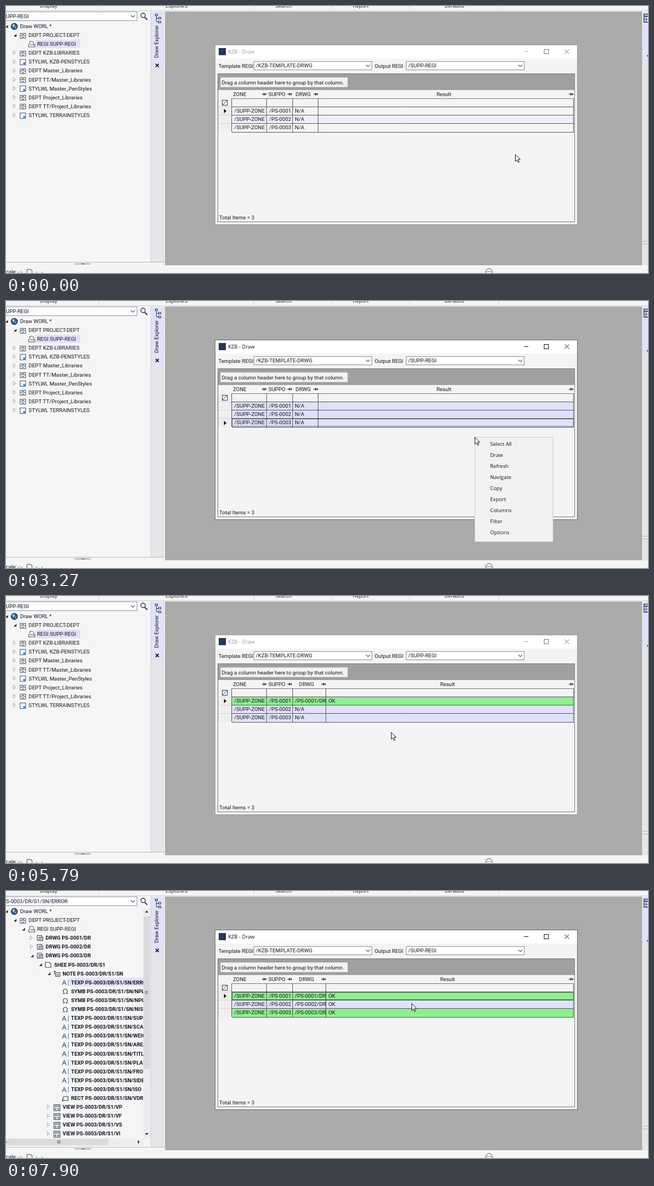
An HTML page with a canvas for the animation above (8 s loop, 1159 by 483 pixels).

```html
<!DOCTYPE html>
<html lang="en">
<head>
<meta charset="utf-8">
<title>Draw</title>
<style>
html, body { margin: 0; width: 100%; height: 100%; overflow: hidden; background: #f5f5f5; }
canvas { display: block; width: 1159px; height: 483px; }
</style>
</head>
<body>
<canvas id="stage"></canvas>
<script>
const W = 1159, H = 483, LOOP = 8000;
const canvas = document.getElementById('stage');
const dpr = window.devicePixelRatio || 1;
canvas.width = W * dpr;
canvas.height = H * dpr;
const g = canvas.getContext('2d');

const UI = '9.6px Roboto, "Liberation Sans", sans-serif';
const BOLD = 'bold 9.4px Roboto, "Liberation Sans", sans-serif';
const TITLE = '9.4px "Open Sans", "Noto Sans", sans-serif';
const INK = '#141420', PANEL = '#f4f4f4', STRIP = '#e6e6ea', LILAC = '#e1e1f9', NAVY = '#26375c', BLUE = '#0078d7';

function box(x, y, w, h, fill, edge, lw = 1) {
  if (fill) { g.fillStyle = fill; g.fillRect(x, y, w, h); }
  if (edge) {
    g.strokeStyle = edge;
    g.lineWidth = lw;
    g.strokeRect(x + lw / 2, y + lw / 2, w - lw, h - lw);
  }
}

function text(s, x, y, color = INK, font = UI, align = 'left') {
  g.font = font;
  g.fillStyle = color;
  g.textAlign = align;
  g.fillText(s, x, y);
}

function path(pts, stroke, lw = 1, fill, close) {
  g.beginPath();
  pts.forEach(([x, y], i) => i ? g.lineTo(x, y) : g.moveTo(x, y));
  if (close) g.closePath();
  if (fill) { g.fillStyle = fill; g.fill(); }
  if (stroke) { g.strokeStyle = stroke; g.lineWidth = lw; g.stroke(); }
}

const hline = (x0, x1, y, c, lw = 1) => path([[x0, y], [x1, y]], c, lw);
const vline = (x, y0, y1, c, lw = 1) => path([[x, y0], [x, y1]], c, lw);

function disc(x, y, r, fill, edge, lw = 1) {
  g.beginPath();
  g.arc(x, y, r, 0, 7);
  if (fill) { g.fillStyle = fill; g.fill(); }
  if (edge) { g.strokeStyle = edge; g.lineWidth = lw; g.stroke(); }
}

function cross(x, y, r, c, lw = 1) {
  path([[x - r, y - r], [x + r, y + r]], c, lw);
  path([[x + r, y - r], [x - r, y + r]], c, lw);
}

function clipped(x, y, w, h, draw) {
  g.save();
  g.beginPath();
  g.rect(x, y, w, h);
  g.clip();
  draw();
  g.restore();
}

const chevron = (x, y, c = '#444') => path([[x - 3.5, y - 1.7], [x, y + 1.8], [x + 3.5, y - 1.7]], c, 1.1);

// Tree icons, centred on x, y
const icons = {
  world(x, y) {
    disc(x, y, 5.8, '#2d5c8c', '#1d2f4a');
    path([[x - 4, y - 2], [x, y - 5], [x + 1, y - 1], [x - 2, y + 2]], 0, 0, '#a9c6d8', true);
    path([[x + 1, y + 1], [x + 4, y], [x + 2, y + 4]], 0, 0, '#a9c6d8', true);
  },
  dept(x, y) {
    box(x - 5, y - 4, 11, 10, '#fff', '#555b66');
    hline(x - 5, x + 6, y + .5, '#555b66');
    hline(x - 2, x + 3, y - 1.5, '#333');
    hline(x - 2, x + 3, y + 3.5, '#333');
  },
  regi(x, y) {
    path([[x - 3, y + 1], [x - 3, y - 5], [x + 2, y - 5], [x + 4, y - 3], [x + 4, y + 1]], '#444b58', 1, '#fff');
    path([[x - 5, y], [x - 5, y + 5], [x + 6, y + 5], [x + 6, y + 1], [x - 2, y + 1]], '#444b58', 1.1);
  },
  style(x, y) {
    box(x - 5, y - 5, 11, 11, '#f8fbff', '#47536a');
    box(x + 1, y + 1, 5, 5, '#4d8fd0');
  },
  drwg(x, y) {
    box(x - 5, y - 5, 9, 10, '#fff', '#333b48');
    box(x - 2, y - 2, 8, 7, '#eef1f5', '#333b48');
    disc(x + 2, y + 1.5, 1.4, null, '#333b48', .8);
  },
  shee(x, y) {
    path([[x - 5, y - 4], [x + 2, y - 4], [x + 5, y - 1], [x + 5, y + 5], [x - 5, y + 5]], '#333b48', 1.1, '#fff', true);
  },
  note(x, y) {
    box(x - 3, y - 2, 9, 8, '#fff', '#333b48');
    hline(x - 1, x + 4, y + 1.5, '#555');
    hline(x - 1, x + 4, y + 3.5, '#555');
    hline(x - 6, x - 2, y - 3.5, '#333b48');
    vline(x - 4.5, y - 5, y + 2, '#333b48');
  },
  texp(x, y) {
    text('A', x - 6, y + 5, '#2c3444', '13px "Open Sans", sans-serif');
    vline(x + 5.5, y - 5, y + 6, '#4b83bd');
  },
  symb(x, y) { text('Ω', x, y + 5, '#2c3444', '13px "Open Sans", sans-serif', 'center'); },
  rect(x, y) {
    path([[x - 5, y + 4], [x - 3, y - 3], [x + 5, y - 3], [x + 5, y + 4]], '#333b48', 1.1, null, true);
    disc(x - 5, y + 4, 1.2, '#333b48');
  },
  view(x, y) {
    box(x - 6, y - 5, 12, 12, '#f3f5f8', '#333b48');
    box(x - 4, y - 3, 8, 3, '#fff', '#566070');
    box(x - 4, y + 2, 3, 3, '#fff', '#566070');
    box(x + 1, y + 2, 3, 3, '#fff', '#566070');
  }
};

// Rows: level, icon, label, arrow (1 open, 2 closed)
const head = [[0, 'world', 'Draw WORL *', 1], [1, 'dept', 'DEPT PROJECT-DEPT', 1]];
const treeA = head.concat([[2, 'regi', 'REGI SUPP-REGI', 0]],
  ['DEPT KZB-LIBRARIES', 'STYLWL KZB-PENSTYLES', 'DEPT Master_Libraries', 'DEPT TT/Master_Libraries',
   'STYLWL Master_PenStyles', 'DEPT Project_Libraries', 'DEPT TT/Project_Libraries', 'STYLWL TERRAINSTYLES']
    .map(s => [1, s[0] === 'D' ? 'dept' : 'style', s, 2]));
const SHEET = 'PS-0003/DR/S1';
const treeB = head.concat(
  [[2, 'regi', 'REGI SUPP-REGI', 1]],
  [1, 2, 3].map(n => [3, 'drwg', `DRWG PS-000${n}/DR`, n < 3 ? 2 : 1]),
  [[4, 'shee', 'SHEE ' + SHEET, 1], [5, 'note', `NOTE ${SHEET}/SN`, 1]],
  ['TEXP ERROR', 'SYMB NPLANE', 'SYMB NPOINT', 'SYMB NISO', 'TEXP SUPPORT', 'TEXP SCALE', 'TEXP WEIGHT',
   'TEXP AREA', 'TEXP TITLE', 'TEXP PLAN', 'TEXP FRONT', 'TEXP SIDE', 'TEXP ISO', 'RECT VDRW']
    .map(s => {
      const [kind, name] = s.split(' ');
      return [6, kind.toLowerCase(), `${kind} ${SHEET}/SN/${name}`, 0];
    }),
  ['VP', 'VF', 'VS', 'VI'].map(v => [5, 'view', `VIEW ${SHEET}/${v}`, 2]));

function tree(rows) {
  rows.forEach(([level, icon, label, arrow], i) => {
    const x = 25.5 + level * 15.35, y = 36.2 + i * 16.1;
    if (arrow === 1) path([[x - 22, y - 2], [x - 22, y + 3], [x - 27, y + 3]], 0, 0, '#222', true);
    if (arrow === 2) path([[x - 27.5, y - 3.5], [x - 23.5, y], [x - 27.5, y + 3.5]], '#a3a3a3', 1, '#fff', true);
    icons[icon](Math.round(x - 10.5), Math.round(y + .3));
    text(label, x, y + 3.7, INK, level > 2 ? BOLD : UI);
  });
}

function scrollbars() {
  box(248, 30, 13, 418, '#ededed');
  box(248, 46, 12, 276, '#dadada');
  path([[251, 39], [257, 39], [254, 35.5]], 0, 0, '#222', true);
  path([[251, 438], [257, 438], [254, 441.5]], 0, 0, '#222', true);
  box(0, 448, 248, 13, '#ededed');
  box(2, 448, 183, 12, '#dadada');
  for (let i = 0; i < 3; i++) {
    hline(251, 256, 181.5 + i * 2, '#666');
    vline(93.5 + i * 2, 451, 457, '#666');
  }
  path([[238, 451], [238, 457], [241.5, 454]], 0, 0, '#222', true);
  path([[0, 452], [0, 456], [1.5, 454]], 0, 0, '#222', true);
}

function sidePanel(t) {
  const expanded = t >= 7280;
  box(0, 0, 287, H, '#f5f5f5');
  box(-4, 10, 241, 17, '#fcfcfc', '#8f96ad');
  text(expanded ? 'PS-0003/DR/S1/SN/ERROR' : 'SUPP-REGI', -6, 22.3);
  chevron(229, 18.5);
  path([[250.5, 20.5], [255, 25]], '#2a3348', 2);
  disc(247.5, 17, 4, null, '#2a3348', 1.4);

  clipped(0, 28, 248, 434, () => {
    if (expanded) box(114, 157, 134, 15, LILAC);
    else box(53, 61, 81, 15, LILAC);
    tree(expanded ? treeB : treeA);
  });
  if (expanded) scrollbars();
  else box(248, 28, 13, 434, '#f5f5f5');

  box(262, 10, 24, 454, STRIP);
  vline(261.5, 10, 463, '#d2d2da');
  box(262, 11, 23, 106, LILAC);
  box(269, 14, 5, 4, null, NAVY);
  path([[271.5, 18], [271.5, 28.5], [275, 28.5]], NAVY);
  hline(271.5, 275, 22.5, NAVY);
  box(275, 20, 5, 4, null, NAVY);
  box(275, 27, 5, 4, null, NAVY);
  g.save();
  g.translate(274.5, 94);
  g.rotate(-Math.PI / 2);
  text('Draw Explorer', 0, 0);
  g.restore();
  cross(273, 107.5, 2.8, '#111', 1.7);
  hline(0, 286, 463.5, '#b9b9bd');
  box(124, 465, 29, 3, '#c4c4c8');
  hline(136, 142, 466.5, '#444');
}

function frame(t) {
  box(0, 0, W, H, '#f5f5f5');
  box(287, 10, 861, 459, '#ababab');
  sidePanel(t);
  hline(0, W, 8.5, '#d2d2d2');
  [['Display', 77], ['Explorers', 308], ['Search', 501], ['Report', 640.5], ['Defaults', 809.5]]
    .forEach(([s, x]) => text(s, x, 3, '#333', UI, 'center'));
  [167.5, 447.5, 587.5, 728.5, 889.5].forEach(x => vline(x, 0, 6, '#d0d0d0'));

  box(1148, 10, 11, 459, STRIP);
  vline(1148.5, 10, 469, '#d0d0d4');
  box(1151, 11, 8, 87, LILAC);
  box(1151, 14, 10, 16, '#e8f0fa', '#26446e', 1.5);
  hline(1152, 1159, 18.5, '#26446e', 2);
  vline(1155.5, 18, 29, '#26446e');
  hline(1152, 1159, 24, '#26446e');
  disc(1159, 90, 1.5, '#111');
  hline(1149, W, 425.5, '#b5b5b5');
  hline(1149, W, 430.5, '#b5b5b5');

  box(0, 469, W, 14, '#f5f5f5');
  text('Scale: -:-', -6, 484);
  path([[38, 483], [38, 477], [41, 476], [47, 478], [47, 484]], '#444');
  text('-   -', 54, 484);
  disc(872, 481, 6, '#fff', '#444');
  [869, 872, 875].forEach(x => disc(x, 480.5, .8, '#222'));
}

function combo(x, label, hot) {
  box(x, 100, 214, 16, '#fff', hot ? BLUE : '#8b8b8b');
  if (hot) box(x + 200, 100, 14, 16, '#cce4f7', BLUE);
  chevron(x + 206.5, 108);
  text(label, x + 4, 111.4);
}

function pin(px) {
  const x = Math.floor(px);
  hline(x - 4, x - 1, 159.5, '#222');
  vline(x - .5, 157, 162, '#222');
  box(x - 1, 158, 5, 3, null, '#222');
}

function grid(t, active) {
  box(382, 122, 645, 269, PANEL, '#777');
  box(383, 123, 643, 29, '#a0a0a0');
  box(387, 129, 230, 18, '#f2f2f2', '#d8d8d8');
  text('Drag a column header here to group by that column.', 389.5, 141.7);

  const wide = t >= 5790, edge = wide ? 577.5 : 563.5;
  const cols = [407.5, 470.5, 517.5, edge, 1024.5];
  [['ZONE', 422], ['SUPPO', 489], ['DRWG', wide ? 542.5 : 536.5], ['Result', wide ? 797 : 790.5]]
    .forEach(([s, x]) => text(s, x, 162.7, INK, UI, 'center'));
  [466, 512.5, edge - 4.5, 1020].forEach(pin);
  vline(383.5, 152, 228, '#ddd');
  box(384, 167, 23, 61, '#efefef');
  box(390, 170, 10, 10, '#fff', '#223b66');
  path([[391, 179], [399, 171]], '#223b66');

  // Selection grows with the drag, results arrive row by row
  const picked = t < 2260 ? 0 : t < 2390 ? 1 : t < 2510 ? 2 : 3;
  const done = wide ? Math.min(3, 1 + Math.floor((t - 5790) / 120)) : 0;
  const hover = t >= 7900 ? 1 : t >= 7770 ? 2 : t >= 1880 && t < 2260 ? 0 : t >= 120 && t < 250 ? 2 : -1;
  const current = wide || t < 2390 ? 0 : t < 2510 ? 1 : 2;
  const rowTop = i => Math.floor(182.3 + i * 15.25);
  for (let i = 0; i < 3; i++) {
    const y = rowTop(i), ok = i < done;
    const bg = i === hover ? LILAC : ok ? '#90ee90' : i < picked ? LILAC : i === 1 ? '#f0efff' : PANEL;
    box(408, y, 617, 16, bg);
    hline(384, 407, y + .5, '#d5d5d5');
    const base = 192.7 + i * 15.25;
    text('/SUPP-ZONE', 412, base);
    text('/PS-000' + (i + 1), 475, base);
    text(ok ? `/PS-000${i + 1}/DR` : 'N/A', 521.5, base);
    if (ok) text('OK', 582, base);
  }
  hline(408, 1025, 167.5, '#777');
  for (let i = 0; i < 4; i++) hline(408, 1025, rowTop(i) + .5, '#555');
  cols.forEach(x => vline(x, 167, 228, '#555'));
  if (active && t >= 2260) {
    g.setLineDash([1, 1]);
    box(408, rowTop(current) + 1, 617, 14, null, '#111');
    g.setLineDash([]);
  }
  const my = 190 + current * 15.4;
  path([[393.5, my - 4], [398, my], [393.5, my + 4]], 0, 0, '#111', true);
  text('Total Items = 3', 385, 385.7);
}

function mainWindow(t) {
  const active = t >= 620 && t < 4400 || t >= 5520 && t < 5650 || t >= 7280;
  box(377, 70, 655, 326, PANEL, active ? '#666' : '#999');
  box(378, 71, 653, 24, '#fff');
  box(384, 76, 13, 13, NAVY);
  text('KZB - Draw', 401, 86.3, active ? '#111' : '#999', TITLE);
  hline(935, 943, 82.5, active ? '#111' : '#aaa');
  box(971, 78, 9, 9, null, active ? '#111' : '#777');
  cross(1012.5, 82.5, 4, active ? '#111' : '#777');

  text('Template REGI', 383.5, 111.7);
  text('Output REGI', 665.5, 111.7);
  combo(447, '/KZB-TEMPLATE-DRWG', false);
  combo(722, '/SUPP-REGI', t >= 370 && t < 1750);
  grid(t, active);
  if (t >= 750 && t < 1380) {
    box(722, 116, 214, 13, BLUE);
    text('/SUPP-REGI', 725, 126.3, '#fff');
  }
}

function menu(t) {
  if (t < 3270 || t >= 4150) return;
  const open = t < 4020;
  if (open) {
    box(846, 246, 142, 190, '#f2f2f2', '#c8c8c8');
    ['Select All', '', 'Refresh', 'Navigate', 'Copy', 'Export', 'Columns', 'Filter', 'Options']
      .forEach((s, i) => text(s, 874, 262 + i * 20, INK, TITLE));
  }
  if (t >= 3770) box(848, 270, 138, 18, open ? '#91c9f7' : '#9fcff4');
  text('Draw', 874, 282.3, open ? INK : '#444', TITLE);
}

function button(label, x, w, main) {
  box(x, 240, w, 24, main ? '#e4e6f6' : '#dcdcdc', '#111', main ? 2 : 1);
  if (main) {
    g.setLineDash([1, 1]);
    box(x + 3, 243, w - 6, 18, null, '#333');
    g.setLineDash([]);
  }
  text(label, x + w / 2, 255.3, INK, UI, 'center');
}

function dialog(x, w, title, mark, lines, closeColor) {
  box(x, 172, w, 101, PANEL, '#777');
  box(x + 1, 173, w - 2, 21, '#fff');
  box(x + 4, 177, 11, 11, NAVY);
  text(title, x + 20, 186.2, '#111', TITLE);
  cross(x + w - 13, 183, 3.6, closeColor);
  const cx = x + 23.5, glow = g.createLinearGradient(0, 203, 0, 228);
  glow.addColorStop(0, '#5a80bd');
  glow.addColorStop(.5, '#1b3f8a');
  glow.addColorStop(1, '#2e66b5');
  disc(cx, 215, 12.2, '#d8dce4', '#9aa0ac');
  disc(cx, 215, 10.8, glow);
  text(mark, cx, 221.5, '#fff', 'bold 18px "Noto Serif", serif', 'center');
  lines.forEach((s, i) => text(s, x + 44.7, 211.3 + i * 9.8));
}

function dialogs(t) {
  if (t >= 4400 && t < 5520) {
    g.globalAlpha = t < 4520 ? .5 : 1;
    dialog(641, 203, 'Confirm', '?',
      ['It takes a lot of time to generate', 'support drawings. Are you sure?'], '#c4c4c4');
    button('Yes', 674, 67, true);
    button('No', 744, 67, false);
    g.globalAlpha = 1;
  }
  if (t >= 6150 && t < 7280) {
    dialog(629, 228, 'Message', 'i', ['Generating support drawings has been', 'finished.'], '#222');
    button('OK', 710, 66, true);
  }
}

// Pointer stops: time, x, y
const stops = [
  [0, 919, 268], [120, 900, 224], [250, 852, 140], [370, 834, 106],
  [1750, 838, 146], [1880, 843, 198], [2390, 844, 222], [2510, 846, 246],
  [3640, 856, 264], [3770, 866, 282],
  [4650, 822, 273], [4770, 762, 259], [4900, 712, 249], [5020, 695, 246],
  [6530, 710, 247], [6650, 724, 249], [6780, 731, 250],
  [7770, 732, 222], [7900, 732, 203]
];
// Click marks: start, end, strength
const clicks = [[620, 750, .65], [1250, 1380, .65], [2260, 2510, .65], [2760, 3010, .65],
  [3010, 3270, .35], [3900, 4020, .65], [5400, 5520, .65], [7160, 7280, .65]];

function pointer(t) {
  const [, x, y] = stops.filter(s => s[0] <= t).pop();
  const click = clicks.find(([a, b]) => t >= a && t < b);
  if (click) disc(x, y, 9.8, `rgba(242, 226, 0, ${click[2]})`);
  const shape = [[0, 0], [0, 12.5], [3, 9.8], [5, 14.5], [7, 13.6], [5, 9.2], [8.8, 9]];
  path(shape.map(([a, b]) => [x + .5 + a, y + .5 + b]), '#111', 1, '#fff', true);
}

function draw(now) {
  const t = now % LOOP;
  g.setTransform(dpr, 0, 0, dpr, 0, 0);
  frame(t);
  mainWindow(t);
  menu(t);
  dialogs(t);
  pointer(t);
}

let start;
function tick(now) {
  if (start === undefined) start = now;
  draw(Math.max(0, now - start));
  requestAnimationFrame(tick);
}
requestAnimationFrame(tick);
</script>
</body>
</html>
```
